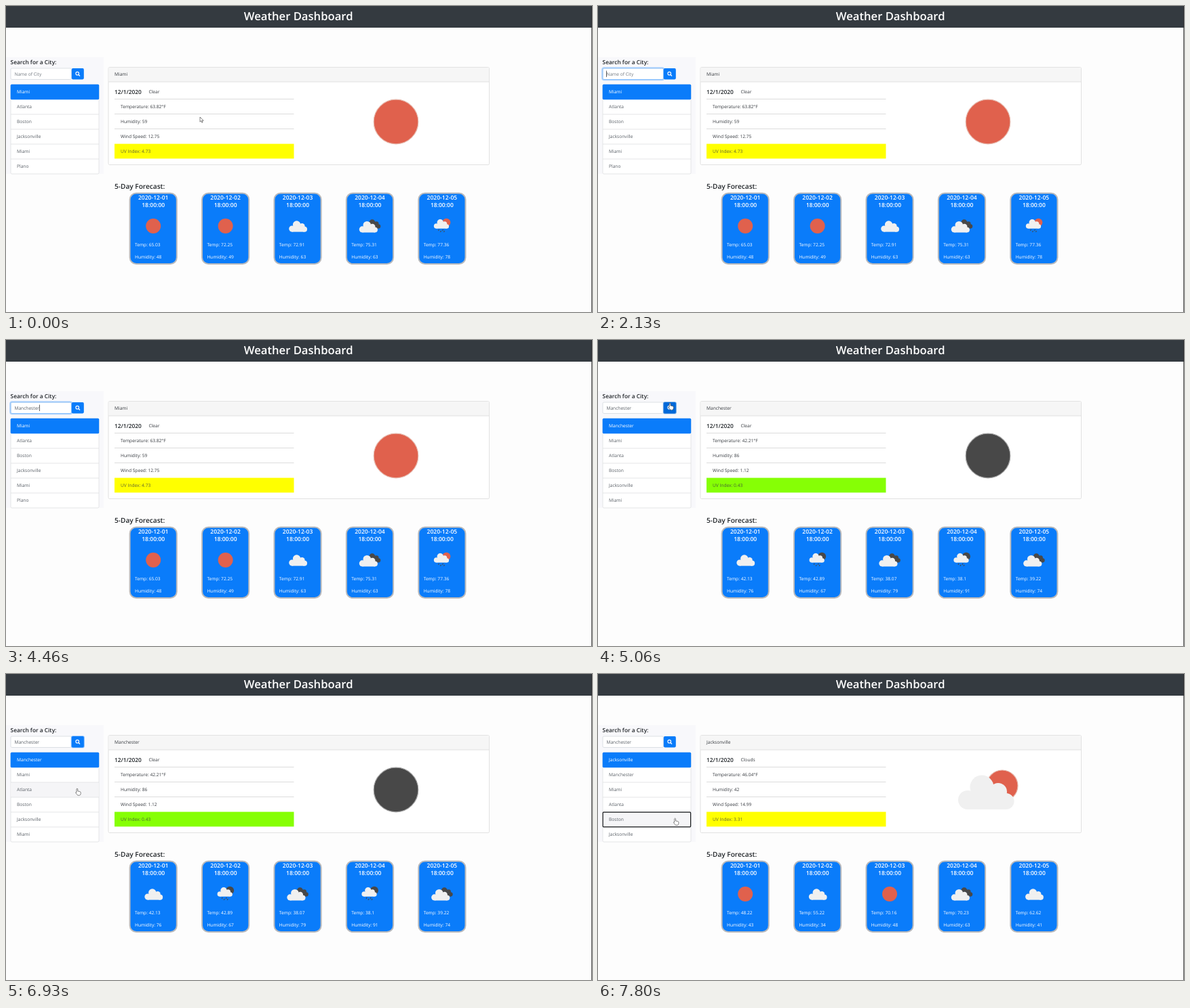
These frames come from a looping animation (864x452 px, 8 s). An HTML page:

```html
<!DOCTYPE html>
<html lang="en">
<head>
<meta charset="utf-8">
<title>Weather Dashboard</title>
<style>
  html, body { margin: 0; width: 100%; height: 100%; overflow: hidden; background: #fdfdfd; }
  svg { display: block; width: 100vw; height: 100vh; }
  text { font: 6.65px "Open Sans", "Noto Sans", sans-serif; fill: #373b40; text-rendering: geometricPrecision; }
  .title { font-size: 16.65px; font-weight: 600; fill: #fff; text-anchor: middle; }
  .h4 { font-size: 10.1px; font-weight: 600; fill: #212529; }
  .h5 { font-size: 8.35px; font-weight: 600; fill: #212529; }
  .day { font-size: 8.55px; font-weight: 600; fill: #fff; text-anchor: middle; }
  .white { fill: #fff; }
  .muted { fill: #5a6067; }
  .hint { fill: #747b82; }
</style>
</head>
<body>
<svg id="stage" viewBox="0 0 864 452" preserveAspectRatio="none"></svg>
<script>
const LOOP = 8000;
const BLUE = '#0a7cfa', SUN = '#e0614d', NIGHT = '#484848', CLOUD = '#f0f0f0';
const CLICK_INPUT = 1060, CLICK_SEARCH = 4860, SHOW_SEARCH = 5000;
const CLICK_ROW = 7400, SHOW_ROW = 7670;

const TYPED = 'Manchester';
const KEY_TIMES = [2660, 2800, 3000, 3130, 3330, 3430, 3530, 3730, 3860, 4000];

const REPORTS = [
  { start: 0, cities: 'Miami,Atlanta,Boston,Jacksonville,Miami,Plano', sky: 'Clear', icon: 'sun',
    temp: 63.82, humidity: 59, wind: 12.75, uv: 4.73, uvColor: '#ff0',
    days: [['sun', 65.03, 48], ['sun', 72.25, 49], ['cloud', 72.91, 63], ['clouds', 75.31, 63], ['sunRain', 77.36, 78]] },
  { start: SHOW_SEARCH, cities: 'Manchester,Miami,Atlanta,Boston,Jacksonville,Miami', sky: 'Clear', icon: 'night',
    temp: 42.21, humidity: 86, wind: 1.12, uv: 0.43, uvColor: '#86ff05',
    days: [['cloud', 42.13, 76], ['nightRain', 42.89, 67], ['clouds', 38.07, 79], ['nightRain', 38.1, 91], ['clouds', 39.22, 74]] },
  { start: SHOW_ROW, cities: 'Jacksonville,Manchester,Miami,Atlanta,Boston,Jacksonville', sky: 'Clouds', icon: 'sunCloud',
    temp: 46.04, humidity: 42, wind: 14.99, uv: 3.31, uvColor: '#ff0',
    days: [['sun', 48.22, 43], ['cloud', 55.22, 34], ['sun', 70.16, 48], ['clouds', 70.23, 63], ['cloud', 62.62, 41]] },
];

// Pointer stops: time, x, y
const POINTER = [
  [60, 286, 164], [530, 60, 100], [4460, 60, 100], [4800, 106, 93], [5460, 106, 93],
  [6260, 104, 146], [6600, 104, 146], [6930, 104.8, 169], [7130, 113.5, 213],
];

const clamp = v => Math.max(0, Math.min(1, v));
const smooth = v => v * v * (3 - 2 * v);
const text = (x, y, s, cls = '') => `<text x="${x}" y="${y}" class="${cls}">${s}</text>`;
const rect = (x, y, w, h, fill, extra = '') =>
  `<rect x="${x}" y="${y}" width="${w}" height="${h}" fill="${fill}" ${extra}/>`;
const circle = (x, y, r, fill, extra = '') => `<circle cx="${x}" cy="${y}" r="${r}" fill="${fill}" ${extra}/>`;
const line = (x1, y1, x2, y2, color, width = 1) =>
  `<path d="M${x1} ${y1}L${x2} ${y2}" stroke="${color}" stroke-width="${width}"/>`;
const border = (color, width = 1) => `stroke="${color}" stroke-width="${width}"`;

function pointerAt(t) {
  const next = POINTER.findIndex(p => p[0] > t);
  if (next === 0) return POINTER[0].slice(1);
  if (next < 0) return POINTER[POINTER.length - 1].slice(1);
  const [t0, x0, y0] = POINTER[next - 1], [t1, x1, y1] = POINTER[next];
  const k = smooth((t - t0) / (t1 - t0));
  return [x0 + (x1 - x0) * k, y0 + (y1 - y0) * k];
}

const cloud = (x, y, scale, fill) => `<g transform="translate(${x} ${y}) scale(${scale})">` +
  circle(-27, 11, 14, fill) + circle(-6, -8, 17.5, fill) + circle(18, -1, 13, fill) +
  circle(29.5, 13, 12, fill) + rect(-27, 0, 56.5, 25, fill) + '</g>';

const rainCloud = (x, y, disc) => circle(x + 6.5, y - 5.2, 6, disc) + cloud(x - 1, y - 3, .27, CLOUD) +
  [[-5, 6], [-2, 8], [1, 6], [3, 8]].map(([dx, dy]) =>
    line(x + dx + .6, y + dy - .9, x + dx - .4, y + dy + .9, NIGHT, 1.1)).join('');

const dayIcons = {
  sun: (x, y) => circle(x, y, 11, SUN),
  cloud: (x, y) => cloud(x + .5, y + .5, .325, CLOUD),
  clouds: (x, y) => cloud(x + 5, y - 3, .26, NIGHT) + cloud(x - 2.2, y + 1.3, .33, CLOUD),
  sunRain: (x, y) => rainCloud(x, y, SUN),
  nightRain: (x, y) => rainCloud(x, y, NIGHT),
};

const mainIcons = {
  sun: () => circle(575, 171, 32.8, SUN, border('#e6b5a9', 1.2)),
  night: () => circle(575, 171, 32.8, NIGHT, border('#a0a0a0', 1.2)),
  sunCloud: () => circle(596, 165, 23, SUN, border('#e6b5a9', 1.2)) + cloud(572, 175, 1, CLOUD),
};

function searchBox(t, hover) {
  const focus = clamp((t - CLICK_INPUT) / 150) * (1 - clamp((t - CLICK_SEARCH) / 150));
  const count = KEY_TIMES.filter(k => t >= k).length;
  const ringed = t >= CLICK_SEARCH && t < CLICK_ROW;
  const caretStart = count ? KEY_TIMES[count - 1] : CLICK_INPUT;
  const caretOn = t >= CLICK_INPUT && t < CLICK_SEARCH && Math.floor((t - caretStart) / 532) % 2 === 0;
  const caret = caretOn ? '<tspan id="caret"></tspan>' : '';
  return text(6.6, 86.2, 'Search for a City:', 'h5') +
    rect(6.6, 91.6, 90.4, 17.2, 'none', `rx="2.5" ${border('#80bdff', 2.8)} opacity="${focus * .6}"`) +
    rect(7, 92, 89.5, 16.5, '#fff', `rx="1.8" ${border('#ced4da', .7)}`) +
    rect(7, 92, 89.5, 16.5, 'none', `rx="1.8" ${border('#80bdff', .9)} opacity="${focus}"`) +
    text(12.4, 103.2, count ? TYPED.slice(0, count) + caret : 'Name of City', count ? 'muted typed' : 'hint') +
    (caretOn ? `<path id="bar" d="M12.5 95.6V105" stroke="#222" stroke-width=".7"/>` : '') +
    (ringed ? rect(95.8, 91.2, 20, 18, hover ? '#70a9e4' : '#85beff', 'rx="2.8"') : '') +
    rect(96.8, 92.1, 18, 16.3, hover ? '#0069d9' : BLUE, 'rx="1.8"') +
    circle(105.2, 99.7, 2.3, 'none', border('#fff', 1.1)) + line(106.9, 101.4, 109, 103.5, '#fff', 1.3);
}

function cityList(t, cities, hoverRow) {
  let out = rect(7, 116, 130, 132, '#fff', `rx="1.8" ${border('#dedfe1', .8)}`);
  cities.split(',').forEach((city, i) => {
    const y = 116 + 22 * i;
    if (i === 0) out += rect(6.7, y - .2, 130.5, 22.4, BLUE, 'rx="1.6"');
    else {
      if (i === hoverRow) out += rect(7.4, y + .3, 129.2, 21.4, '#f5f5f7');
      if (i > 1) out += line(7, y, 137, y, '#dedfe1', .8);
    }
    out += text(16, y + 13.4, city, i ? 'muted' : 'white');
  });
  if (t >= CLICK_ROW) out += rect(7.2, 204.2, 129.4, 21.6, 'none', `rx="1" ${border('#16181b', 1.2)}`);
  return out;
}

function currentCard(r) {
  const rows = [`Temperature: ${r.temp}°F`, `Humidity: ${r.humidity}`, `Wind Speed: ${r.wind}`];
  return rect(151, 90.5, 561.5, 144, '#fff', `rx="1.8" ${border('#dedede', .9)}`) +
    rect(151.4, 90.9, 560.7, 21, '#f6f6f6') + line(151, 112, 712.5, 112, '#dedede', .9) +
    text(160, 103.4, r.cities.split(',')[0]) +
    text(160, 130, '12/1/2020', 'h5') + text(210.5, 129.4, r.sky) +
    rows.map((s, i) => line(160, 137.5 + 22 * i, 424.5, 137.5 + 22 * i, '#d9d9d9', .9) +
      text(169, 151.3 + 22 * i, s)).join('') +
    rect(160, 203.6, 264.5, 21.8, r.uvColor) +
    `<g opacity=".8">${text(169, 217.3, 'UV Index: ' + r.uv)}</g>` + mainIcons[r.icon]();
}

const forecast = days => text(160, 269.7, '5-Day Forecast:', 'h4') + days.map(([icon, temp, humidity], i) => {
  const x = 217.2 + 106.42 * i;
  return rect(x - 34.6, 276.5, 69.2, 104.6, BLUE, `rx="9.5" ${border('#b9babd', 2)}`) +
    text(x, 286.2, '2020-12-0' + (i + 1), 'day') + text(x, 297.3, '18:00:00', 'day') +
    dayIcons[icon](x, 325) +
    text(x - 27.2, 355.3, 'Temp: ' + temp, 'white') + text(x - 27.2, 373.4, 'Humidity: ' + humidity, 'white');
}).join('');

function pointer(x, y, hand) {
  const shape = hand
    ? 'M-.8 .8Q.1-.6 1 .8V4L4 4.6Q5.4 5 5.4 6.3V7.6Q5.2 9.9 3.8 10.2H1.2Q.2 9.8-.6 8.4L-2.2 6.3Q-1.9 5.1-.8 6Z'
    : 'M0 0V7.2L1.7 5.6 2.9 8.3 4 7.8 2.9 5.3H5.2Z';
  return `<path d="${shape}" transform="translate(${x} ${y})" fill="#fff" stroke="#333" stroke-width=".6"/>`;
}

const stage = document.getElementById('stage');
let shown = '';

function draw(t) {
  const report = REPORTS.filter(r => t >= r.start).pop();
  const [x, y] = pointerAt(t);
  const inColumn = x > 7 && x < 137;
  const hoverRow = inColumn && y >= 116 && y < 248 ? Math.floor((y - 116) / 22) : -1;
  const inInput = x > 7 && x < 97 && y > 92 && y < 109;
  const onButton = x >= 97 && x < 115 && y > 92 && y < 109;

  const markup = rect(0, 0, 864, 452, '#fdfdfd') + rect(0, 0, 864, 32, '#343a40') +
    text(431.2, 21.3, 'Weather Dashboard', 'title') +
    rect(0, 75.5, 144, 172.5, '#f8f8fb') +
    searchBox(t, onButton) + cityList(t, report.cities, hoverRow) +
    currentCard(report) + forecast(report.days) +
    rect(863.2, 0, .8, 452, '#2b2b2b') +
    (inInput ? '' : pointer(x, y, onButton || hoverRow >= 0));
  if (markup === shown) return;
  shown = markup;
  stage.innerHTML = markup;

  // The caret follows the end of the typed text.
  const typed = stage.querySelector('.typed'), bar = stage.querySelector('#bar');
  if (typed && bar) bar.setAttribute('transform', `translate(${typed.getComputedTextLength() + .3} 0)`);
}

const begin = performance.now();
function tick() {
  draw((performance.now() - begin) % LOOP);
  requestAnimationFrame(tick);
}
tick();
</script>
</body>
</html>
```
